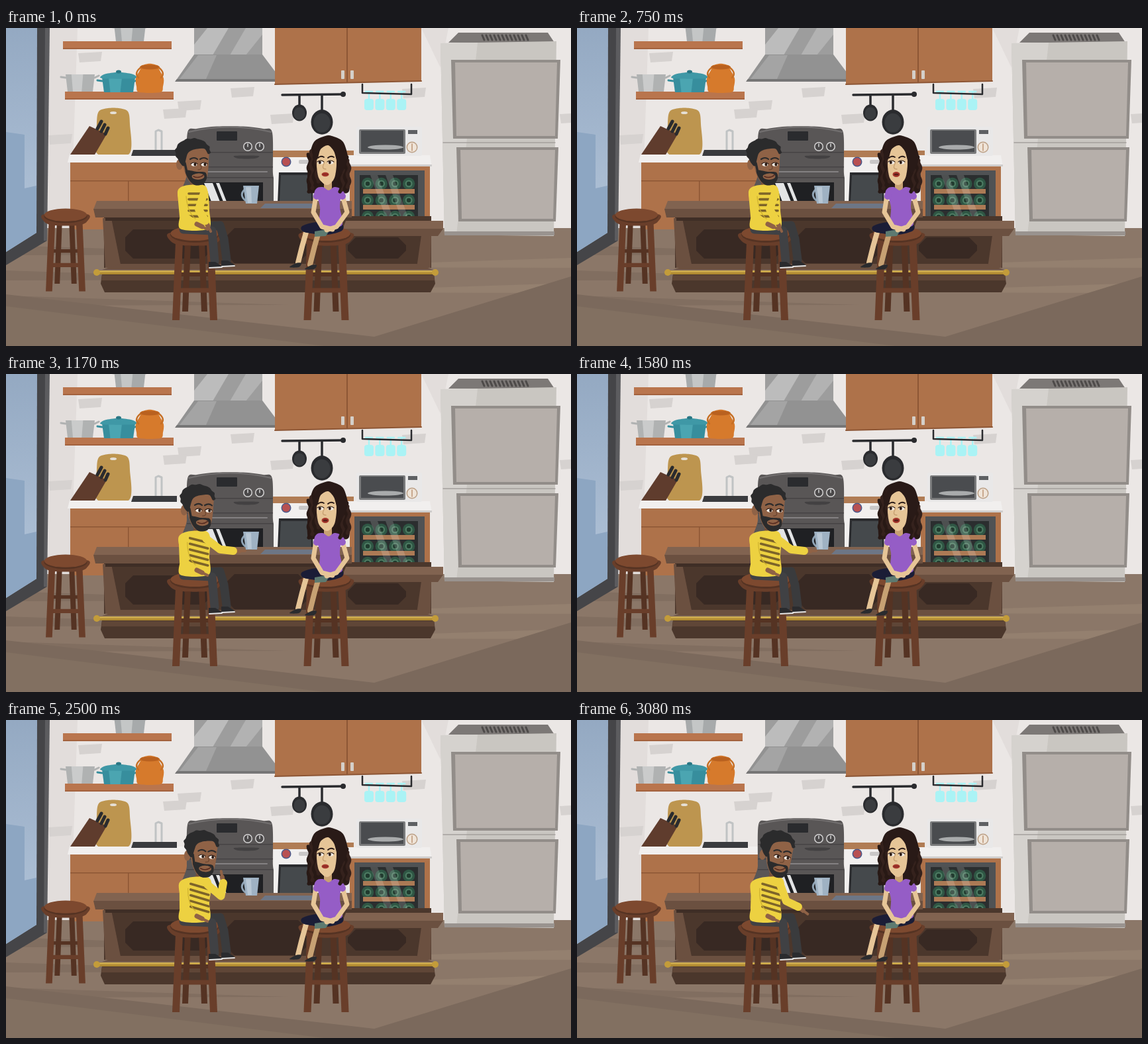
An HTML page with a canvas that plays this animation: 853 px wide and 480 px high, repeating every 3160 ms.

```html
<!DOCTYPE html>
<html lang="en">
<head>
<meta charset="utf-8">
<title>Kitchen talk</title>
<style>
html, body { margin: 0; width: 100%; height: 100%; overflow: hidden; background: #ece8e6; }
canvas { display: block; width: 853px; height: 480px; }
</style>
</head>
<body>
<canvas id="stage" width="853" height="480"></canvas>
<script>
const stage = document.getElementById('stage').getContext('2d');
const LOOP = 3160, STEPS = 38;
let g = stage;

// ---------- drawing helpers ----------
function fillPath(color) {
  g.fillStyle = color;
  g.fill();
}
function strokePath(color, w) {
  g.strokeStyle = color;
  g.lineWidth = w;
  g.lineCap = g.lineJoin = 'round';
  g.stroke();
}
function trace(p) {
  g.beginPath();
  for (let i = 0; i < p.length; i += 2) g.lineTo(p[i], p[i + 1]);
}
function poly(color, ...p) {
  trace(p);
  fillPath(color);
}
function line(color, w, ...p) {
  trace(p);
  strokePath(color, w);
}
function rect(color, x, y, w, h, r = 0) {
  g.beginPath();
  g.roundRect(x, y, w, h, r);
  fillPath(color);
}
function oval(color, x, y, rx, ry = rx) {
  g.beginPath();
  g.ellipse(x, y, rx, ry, 0, 0, 7);
  fillPath(color);
}
function curve(color, w, x, y, cx, cy, ex, ey) {
  g.beginPath();
  g.moveTo(x, y);
  g.quadraticCurveTo(cx, cy, ex, ey);
  strokePath(color, w);
}
// trapezoid: left, right, y of the top edge, then of the bottom edge
function trap(color, l, r, y, bl, br, by) {
  poly(color, l, y, r, y, br, by, bl, by);
}
// closed spline through the points
function blob(color, ...p) {
  const n = p.length / 2;
  const at = (i, k) => p[((i + n) % n) * 2 + k];
  g.beginPath();
  g.moveTo(p[0], p[1]);
  for (let i = 0; i < n; i++) {
    const c = [];
    for (const k of [0, 1]) {
      c[k] = at(i, k) + (at(i + 1, k) - at(i - 1, k)) / 7;
      c[k + 2] = at(i + 1, k) - (at(i + 2, k) - at(i, k)) / 7;
    }
    g.bezierCurveTo(...c, at(i + 1, 0), at(i + 1, 1));
  }
  fillPath(color);
}
// spline mirrored about x = cx, from half widths and heights
function vase(color, cx, ...half) {
  const left = [], right = [];
  for (let i = 0; i < half.length; i += 2) {
    right.push(cx + half[i], half[i + 1]);
    left.unshift(cx - half[i], half[i + 1]);
  }
  blob(color, ...right, ...left);
}
function times(n, f) {
  for (let i = 0; i < n; i++) f(i);
}

// ---------- room ----------
const WOOD = '#ae724a', EDGE = '#8d5635', WHITE = '#f1efee', IRON = '#2a2b2e';

function shell() {
  rect('#ebe7e5', 0, 0, 853, 320);
  trap('#e2dddb', 62, 108, 0, 62, 97, 320);
  poly('#e2dddb', 627, 0, 668, 0, 656, 60);
  const bricks = [109, 36, 259, 109, 339, 89, 399, 129, 237, 121, 598, 90, 836, 128, 64, 160];
  for (let i = 0; i < bricks.length; i += 2) {
    const x = bricks[i], y = bricks[i + 1];
    poly('#d6d2d0', x, y + 2, x + 36, y, x + 34, y + 14, x + 2, y + 16);
  }
  rect('#8b7768', 0, 302, 853, 178);
  times(5, i => {
    const y = 328 + i * 19, x = i % 2 ? 853 : 0;
    poly(i % 2 ? '#94806f' : '#816e60', x, y, 426, y + 14, x, y + 15);
  });
  poly('#7b695c', 0, 402, 556, 466, 853, 375, 853, 480, 0, 480);
  poly('#827061', 0, 420, 480, 480, 0, 480);
  poly('#454548', 0, 0, 62, 0, 62, 321, 0, 358);
  trap('#5c5c5f', 59, 66, 0, 57, 62, 321);
  const sky = g.createLinearGradient(0, 0, 0, 340);
  sky.addColorStop(0, '#94a9c2');
  sky.addColorStop(1, '#b3c5da');
  poly(sky, 0, 0, 47, 0, 46, 309, 0, 338);
  poly('#8da6c2', 0, 157, 28, 161, 28, 242, 46, 238, 46, 309, 0, 338);
}
function pot(cx, top, bottom, half, color, shine) {
  trap(color, cx - half, cx + half, top, cx - half + 3, cx + half - 3, bottom);
  trap(shine, cx - half * .6, cx + half * .2, top, cx - half * .5, cx + half * .1, bottom);
  line(color, 3, cx - half - 7, top + 4, cx - half, top + 5);
  line(color, 3, cx + half, top + 5, cx + half + 6, top + 2);
}
function shelves() {
  for (const [x, y] of [[86, 20], [89, 96]]) {
    rect('#b9754d', x, y, 164, 12);
    rect('#a3623e', x, y + 10, 164, 2);
  }
  pot(187, -6, 20, 24, '#a7aaab', '#c4c6c6');
  pot(112, 70, 96, 22, '#b0b2b2', '#cacbcb');
  pot(170, 75, 97, 25, '#378e9d', '#4ba5b1');
  vase('#3f98a6', 170, 5, 67, 22, 70, 25, 76);
  oval('#297785', 170, 66, 4, 2.5);
  vase('#d67a2c', 217, 3, 54, 13, 57, 14, 62, 21, 76, 20, 88, 16, 97);
  oval('#b9611f', 217, 59, 15, 3.5);
  for (const k of [-1, 1]) curve('#c66f25', 2.5, 217 + k * 14, 60, 217 + k * 24, 68, 217 + k * 17, 75);
}
function sink() {
  rect(WOOD, 97, 202, 178, 102);
  rect(EDGE, 97, 230, 178, 1.5);
  rect(EDGE, 184, 231, 1.5, 72);
  vase('#bd954f', 162, 8, 121, 22, 126, 25, 145, 24, 190);
  oval('#e5dfd6', 162, 128, 5, 2);
  poly('#5f3c2d', 97, 191, 126, 148, 152, 160, 134, 191);
  times(3, i => line(IRON, 5, 138 + i * 6, 152 + i * 4, 144 + i * 5, 141 + i * 5));
  line('#c0c3c4', 3, 226, 185, 226, 156, 230, 154, 235, 156, 235, 184);
  trap(WHITE, 96, 275, 191, 93, 275, 203);
  trap('#3a3b3e', 192, 258, 184, 189, 258, 193);
}
function hood() {
  rect('#9d9d9d', 284, 0, 103, 41);
  poly('#bcbcbc', 304, 0, 336, 0, 312, 41, 284, 41, 284, 25);
  poly('#b2b2b2', 362, 0, 387, 0, 387, 10, 362, 41, 338, 41);
  trap('#929292', 284, 387, 40, 256, 417, 80);
  trap('#a4a4a4', 290, 318, 41, 262, 302, 77);
  trap('#767676', 258, 415, 77, 255, 418, 81);
}
function oven() {
  vase('#595656', 338, 20, 148.5, 50, 152, 64, 158, 65, 220, 67, 264);
  curve('#737070', 2, 276, 157, 338, 142, 400, 157);
  for (const y of [187, 209, 225]) rect('#464344', 273, y, 130, 1.5);
  rect(IRON, 318, 156, 31, 14, 1);
  for (const x of [365, 383]) {
    oval('#d5d4d4', x, 179, 7);
    oval('#4a4849', x, 179, 5.5);
    line('#d5d4d4', 1.5, x, 175, x, 179);
  }
  vase('#434142', 363, 18, 193, 12, 197);
  line('#848182', 2, 290, 217, 394, 217);
  rect('#1f2023', 297, 233, 91, 31);
  for (const [x, w] of [[299, 13], [317, 5]]) trap('#e3e4e5', x, x + w, 234, x + 11, x + w + 11, 262);
  rect(WHITE, 404, 195, 100, 70);
  rect('#b07c54', 403, 185, 122, 10);
  oval('#4a5a8c', 423, 202, 7.5);
  oval('#b85052', 423, 202, 6);
  rect('#c9c7c7', 442, 199, 16, 6, 2);
  trap(IRON, 412, 462, 218, 410, 464, 266);
  trap('#45494c', 415, 460, 222, 413, 461, 262);
}
function hanging() {
  poly(WOOD, 406, 0, 627, 0, 627, 80, 406, 85);
  line(EDGE, 2, 406, 85, 627, 80);
  line(EDGE, 2, 515, 0, 515, 82);
  for (const x of [506, 520]) rect('#d4cfc9', x, 64, 5, 13, 1);
  line(IRON, 3.5, 417, 101, 511, 100);
  oval(IRON, 509, 100, 4);
  for (const [x, y, r] of [[443, 128, 11], [477, 142, 16.5]]) {
    line(IRON, 3.5, x, 101, x, y);
    oval(IRON, x, y, r, r * 1.13);
    oval('#3a3c3f', x, y + 1, r * .76, r * .87);
  }
  times(4, i => {
    const x = 548 + i * 16.4;
    rect('#aaf3f5', x - 7, 107, 14, 17, 4);
    line('#aaf3f5', 2.5, x - 5, 96, x + 5, 96, x, 96, x, 107);
  });
  line(IRON, 2.5, 538, 85, 538, 98, 612, 100, 612, 85);
}
function rightCounter() {
  rect(WOOD, 519, 208, 121, 86);
  rect('#505254', 526, 215, 106, 80);
  rect('#2b2e2f', 534, 222, 88, 72);
  times(12, i => {
    const x = 546 + (i % 4) * 20.7, y = 235 + Math.floor(i / 4) * 25;
    oval('#2f5644', x, y, 9.2);
    oval('#4d7b62', x, y, 5.5);
    oval('#203a2e', x, y, 3.2);
  });
  for (const y of [243, 267]) rect('#ac7a55', 539, y, 78, 7);
  for (const x of [550, 573]) trap('rgba(255,255,255,.16)', x, x + 11, 222, x + 26, x + 37, 294);
  trap(WHITE, 500, 640, 192, 500, 643, 209);
  rect('#cfcdcc', 500, 206, 143, 3);
  rect('#e9e8e8', 529, 149, 99, 44, 2);
  rect('#797a7b', 533, 153, 70, 37, 2);
  rect('#4a4c4f', 536, 155, 64, 32);
  oval('#a9abac', 573, 180, 27, 3.5);
  rect('#5e6063', 607, 154, 14, 6);
  oval('#bca086', 613, 180, 8.5);
  oval('#efe4d8', 613, 180, 7);
  line('#bc9575', 1.5, 613, 175, 613, 185);
}
function fridge() {
  trap('#7c7876', 683, 818, 7, 668, 828, 22);
  times(12, i => line('#4d4a49', 3, 719 + i * 6, 11, 722 + i * 6, 18));
  poly('#c9c6c1', 656, 23, 831, 20, 827, 314, 662, 312);
  poly('#d5d2ce', 656, 23, 712, 22, 680, 312, 662, 312);
  line('#a5a09d', 1.5, 660, 173, 829, 173);
  for (const [x, y, r, h] of [[672, 48, 837, 119], [680, 180, 834, 112]]) {
    trap('#928d89', x, r, y, x + 3, r - 4, y + h);
    trap('#b6afaa', x + 6, r - 5, y + 4, x + 8, r - 8, y + h - 4);
  }
  rect('#99938f', 662, 307, 166, 6);
}
function bar() {
  const light = '#816350', mid = '#6b5040', dark = '#4b372c';
  rect(dark, 148, 284, 494, 78);
  for (const [x, y, w, h] of [[180, 304, 130, 44], [333, 302, 120, 53], [516, 316, 88, 32]]) {
    const c = 12;
    poly('#382923', x + c, y, x + w - c, y, x + w, y + c, x + w, y + h - c, x + w - c, y + h, x + c, y + h, x, y + h - c, x, y + c);
  }
  trap(mid, 146, 159, 287, 150, 174, 362);
  trap(mid, 627, 642, 313, 620, 641, 362);
  trap(mid, 172, 620, 356, 145, 645, 365);
  for (const [x, r, y, out] of [[132, 522, 261, 0], [508, 660, 291, 8]]) {
    trap(light, x + 5, r, y, x, r, y + 13);
    trap(mid, x, r, y + 12, x + 3, r - out, y + 25 - out / 4);
  }
  rect('#3f2e26', 150, 286, 358, 5);
  trap(dark, 145, 646, 371, 143, 648, 386);
  trap(dark, 143, 648, 386, 149, 641, 399);
  trap('#5f4637', 145, 646, 373, 144, 647, 381);
  line('#b18b32', 6, 137, 369, 648, 369);
  line('#d5b455', 2, 137, 367.5, 648, 367.5);
  for (const x of [137, 648]) oval('#c39c3a', x, 369, 5);
  trap('#6d7686', 391, 464, 265, 384, 464, 272);
  curve('#8fa3b4', 3, 360, 244, 352, 252, 361, 260);
  trap('#9fb2c3', 358, 382, 238, 362, 379, 265);
  trap('#b8c7d4', 362, 370, 240, 365, 371, 264);
}
function stool(x, y, s) {
  const dark = '#553323', mid = '#693e2a';
  g.save();
  g.translate(x, y);
  g.scale(s, s);
  for (const k of [-1, 1]) trap(dark, k * 6, k * 15, 12, k * 10, k * 19, 117);
  line(dark, 6, -24, 61, 24, 61);
  line(mid, 7, -25, 85, 26, 85);
  for (const k of [-1, 1]) trap(mid, k * 18, k * 29, 12, k * 23, k * 34, 130);
  vase(mid, 0, 37, -2, 36, 11, 20, 17);
  oval(dark, 0, 1, 37, 12);
  oval('#7d492f', 0, -1, 36.5, 11);
  g.restore();
}

// ---------- man ----------
// lean, wrist x and y, direction of the hand
const rest = [0, 301, 291, 1.1], reach = [.43, 343, 267, 0];
const think = [.7, 328, 246, -1.75], offer = [1, 334, 282, .65];
const moves = [[0, rest], [800, rest], [1090, reach], [2060, reach], [2400, think], [2580, think], [2960, offer], [LOOP, offer]];

function poseAt(t) {
  const i = moves.findIndex(m => m[0] > t);
  const [t0, a] = moves[i - 1], [t1, b] = moves[i];
  const u = (t - t0) / (t1 - t0), e = u * u * (3 - 2 * u);
  return a.map((v, k) => v + (b[k] - v) * e);
}
function elbow(x, y, ex, ey, a, b) {
  const dx = ex - x, dy = ey - y, d = Math.hypot(dx, dy);
  const u = (a * a - b * b + d * d) / (2 * d);
  const v = Math.sqrt(Math.max(0, a * a - u * u));
  return [x + (dx * u - dy * v) / d, y + (dy * u + dx * v) / d];
}
function eye(x, y, look) {
  oval('#f4eee6', x, y, 4.4, 2.7);
  oval('#2d1c15', x + look, y, 2, 2.4);
  curve('#2b1b16', 1.2, x - 5, y - 1, x, y - 5, x + 5, y - 1);
}
function hand(color, x, y, dir) {
  const c = Math.cos(dir), s = Math.sin(dir);
  line(color, 7, x, y, x + c * 9, y + s * 9);
  line(color, 4, x, y, x + c * 18, y + s * 18);
}
const MAN = '#8f6246', BEARD = '#2b2b2c';

function manHead(lean) {
  g.save();
  g.translate(285 + 14 * lean, 236);
  g.rotate(.14 * lean * lean);
  g.translate(-285, -236);
  oval(MAN, 262, 206, 5, 8);
  blob(MAN, 267, 185, 303, 183, 306, 200, 303, 226, 291, 237, 278, 233, 269, 215);
  line(BEARD, 3.5, 270, 204, 273, 218);
  blob(BEARD, 271, 215, 276, 229, 285, 237, 297, 236, 303, 227, 301, 218, 288, 217);
  oval(MAN, 290, 224, 9.5, 5);
  curve(BEARD, 1.8, 281, 221, 290, 216, 300, 220);
  curve('#54291f', 1.5, 283, 224, 291, 228, 298, 222);
  const hair = [];
  for (let a = 2.6; a < 6.45; a += .22) {
    const r = 1 + .035 * Math.sin(a * 12);
    hair.push(282 + 26.5 * r * Math.cos(a), 187 + 20.5 * r * Math.sin(a));
  }
  blob(BEARD, ...hair, 305, 190, 299, 182, 282, 184, 274, 190, 269, 208, 263, 204);
  for (const x of [284, 299]) {
    eye(x, 206, 1.4);
    curve(BEARD, 2.2, x - 6, 198, x, 194, x + 5, 198);
  }
  curve('#704a34', 1.5, 293, 206, 298, 214, 290, 214);
  g.restore();
}
function man(t) {
  const [lean, wx, wy, dir] = poseAt(t);
  const shirt = '#edd141', fold = '#cdb02f', neck = 285 + 12 * lean, sx = 299 + 8 * lean;
  line('#3a3b3d', 13, 288, 300, 323, 298, 329, 318, 333, 350);
  line('#404144', 13, 268, 304, 311, 306, 315, 352);
  for (const [x, y] of [[306, 362], [325, 360]]) {
    poly(IRON, x, y - 9, x + 10, y - 9, x + 21, y - 2, x, y);
    line('#e5e5e5', 1.8, x + 1, y, x + 20, y - 1);
  }
  line('#75503a', 12, neck, 230, neck - 2, 240);
  blob(shirt, 263, 303, 264, 275, 259 + 3 * lean, 247, 270 + 8 * lean, 238, sx - 1, 237, sx + 6, 248, 307, 275, 306, 303);
  const tilt = 8 * Math.min(1, lean * 2);
  times(5, i => {
    const x = 276 + 4 * lean, y = 250 + i * 8.6 - tilt / 3;
    line('#7d6429', 3.6, x, y, x + 27, y + tilt);
  });
  const [ex, ey] = elbow(sx, 249, wx, wy, 26, 20);
  hand(MAN, wx, wy, dir);
  line(shirt, 12, sx, 249, ex, ey, wx, wy);
  line(shirt, 12, 265 + 4 * lean, 251, 268, 284, 281, 293);
  curve(fold, 1.2, 272 + 4 * lean, 254, 274, 278, 286, 288);
  hand(MAN, 288, 296, .45);
  manHead(lean);
}

// ---------- woman ----------
function strand(x, top, end, k) {
  const p = [];
  for (let y = top; y <= end; y += 2) p.push(x + 1.6 * Math.sin(y * .32 + k), y);
  line(k % 2 ? '#35221d' : '#281915', 5.5, ...p);
}
function woman(open) {
  const skin = '#e6c597', deep = '#c7a173', hair = '#291a17', top = '#955dc6', skirt = '#1b1d36';
  vase(hair, 487, 5, 163, 22, 172, 30, 200, 31, 246, 12, 248);
  // each limb: bent line from joint to joint
  line(deep, 8, 472, 308, 466, 329, 459, 357);
  line(skin, 8, 454, 305, 447, 330, 441, 354);
  for (const [x, y] of [[428, 361], [451, 364]]) blob(IRON, x, y, x + 10, y - 6, x + 18, y - 6, x + 14, y);
  blob(skirt, 447, 299, 470, 293, 506, 296, 507, 306, 484, 312, 450, 308);
  poly('#5d7a70', 466, 307, 490, 303, 483, 314, 466, 315);
  line(deep, 12, 486, 228, 486, 241);
  blob(top, 468, 244, 478, 240, 487, 245, 496, 240, 506, 245, 504, 270, 507, 298, 475, 300, 474, 270);
  line(skin, 7, 468, 253, 464, 278, 477, 300, 493, 304);
  line(skin, 7, 508, 253, 515, 278, 499, 300, 484, 305);
  line(top, 10, 471, 247, 469, 254);
  line(top, 10, 504, 247, 508, 254);
  times(4, i => strand(458 + i * 4, 191 - i * 5, 247 - i * 5, i));
  times(4, i => strand(505 + i * 4, 185 + i * 5, 247 - i * 2, i));
  blob(skin, 472, 184, 485, 176, 497, 184, 499, 206, 496, 226, 488, 236, 481, 236, 472, 226, 469, 206);
  blob(hair, 463, 196, 469, 175, 486, 164, 506, 172, 516, 196, 506, 220, 500, 203, 495, 186, 486, 177, 475, 183, 470, 198);
  for (const x of [475, 490]) {
    eye(x, 203, -1.2);
    curve(hair, 1.8, x - 4, 196, x, 192, x + 5, 195);
  }
  curve(deep, 1.4, 481, 203, 475, 213, 483, 213);
  oval('#a5352b', 482, 221, 5.5, open ? 4 : 3.2);
  if (open) oval('#5a1d1a', 482, 221, 3.5, 1.6);
  else line('#7b2420', 1, 478, 221, 486, 221);
}

// ---------- animation ----------
const room = document.createElement('canvas');
room.width = 853;
room.height = 480;
g = room.getContext('2d');
for (const part of [shell, shelves, sink, hood, oven, hanging, rightCounter, fridge, bar]) part();
stool(90, 283, .88);
stool(285, 311, 1);
stool(483.5, 311, 1);
g = stage;

const start = performance.now();
function tick() {
  const now = (performance.now() - start) % LOOP;
  const step = Math.floor(now / LOOP * STEPS + .02);
  g.drawImage(room, 0, 0);
  man(step * LOOP / STEPS);
  woman(step > 1 && step < 22 && step % 5 !== 1 && step % 5 !== 3);
  requestAnimationFrame(tick);
}
tick();
</script>
</body>
</html>
```
